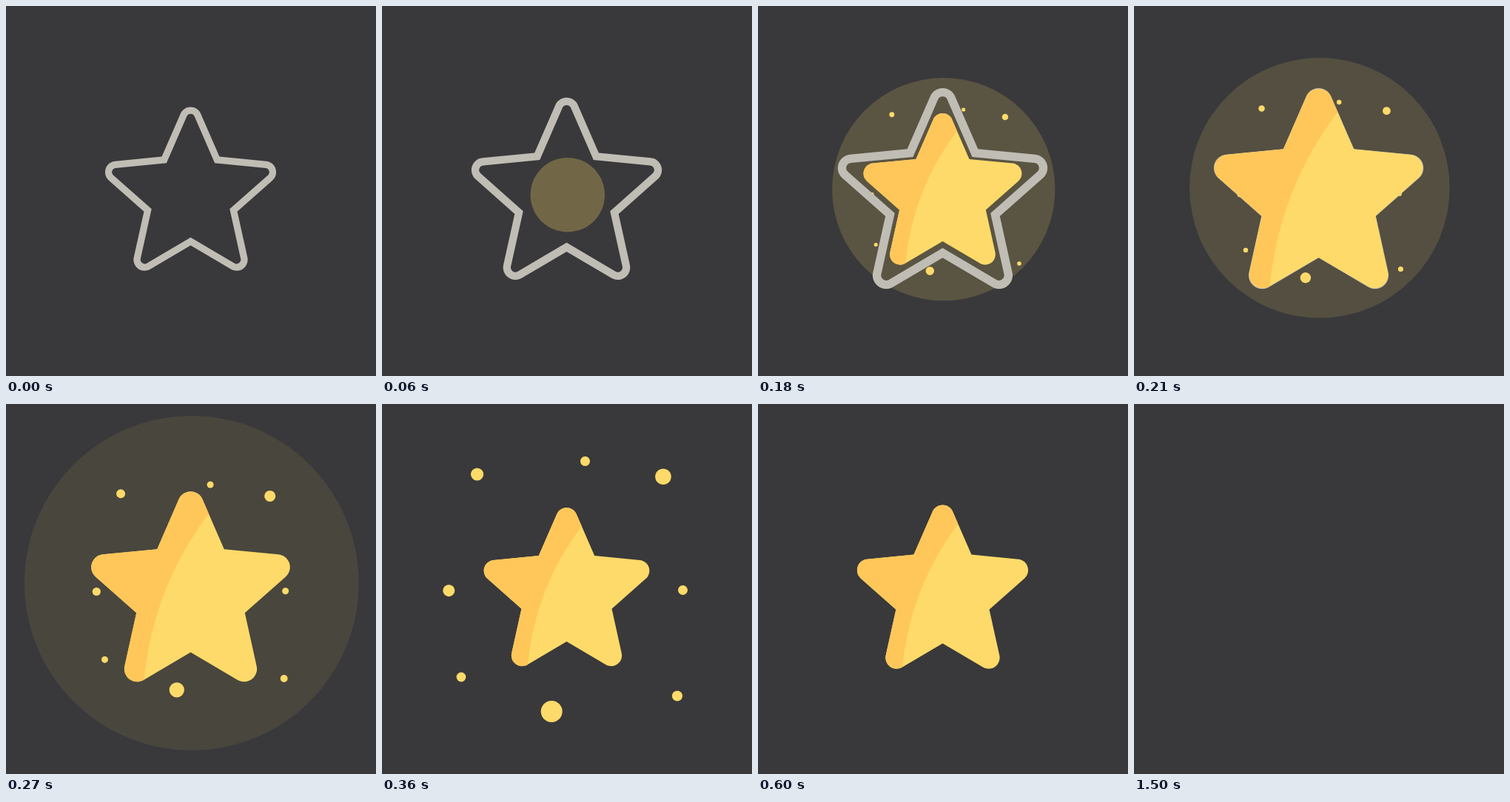
An HTML page with a canvas for the animation above (1.53 s loop, 500 by 500 pixels).

```html
<!DOCTYPE html>
<html lang="en">
<head>
<meta charset="utf-8">
<title>Star burst</title>
<style>
  html, body { margin: 0; width: 100%; height: 100%; overflow: hidden; background: #39393b; }
  canvas { display: block; width: 500px; height: 500px; }
</style>
</head>
<body>
<canvas id="stage" width="500" height="500"></canvas>
<script>
const ctx = document.getElementById('stage').getContext('2d');
const LOOP = 1530, STEP = 30, SHOWN = 1500;
const BG = '#39393b', GREY = '#c0bdb5', YELLOW = '#fdda69', SHADE = '#ffc75a';
const CX = 249.5, CY = 249.3;

// Position and radius at full size, clockwise from the right, 45 degrees apart in heading
const sparks = [
  [406.5, 251.5, 6.5], [399, 394.5, 7.1], [229.2, 415.5, 14.5], [107, 369, 6.4],
  [90.3, 252.2, 8], [128.6, 95, 8.6], [274.5, 77.3, 6.5], [380, 98.2, 10.8]
];
const FULL = 360;

const clamp = (v, lo, hi) => Math.min(hi, Math.max(lo, v));
function ease(t, from, to) {
  const u = clamp((t - from) / (to - from), 0, 1);
  return u * u * (3 - 2 * u);
}

const starSize = t => t <= 210
  ? (t - 85) * .00974
  : 1.218 - .384 * ease(t, 210, 459) + .166 * ease(t, 459, 600);
const outlineSize = t => 1 + .226 * Math.min(t / 120, 1);
const sparkSize = t => clamp(Math.min((t - 62) / 298, (540 - t) / 100), 0, 1.05);
const swing = t => Math.sin(.0034 * (t - 295)) / 1.149;

function starPath() {
  const path = new Path2D();
  const at = (k, r) => {
    const a = k * Math.PI / 5;
    return [r * Math.sin(a), 7.9 - r * Math.cos(a)];
  };
  path.moveTo(...at(-1, 66.3));
  for (let k = 0; k < 10; k += 2) {
    path.arcTo(...at(k, 143.2), ...at(k + 1, 66.3), 14.9);
    path.lineTo(...at(k + 1, 66.3));
  }
  path.closePath();
  return path;
}
const star = starPath();
const shade = new Path2D('M22.5 -89 Q-44.5 -1.3 -54.5 109 L-130 130 V-130 H22.5Z');

function disc(x, y, r) {
  ctx.beginPath();
  ctx.arc(x, y, r, 0, 2 * Math.PI);
  ctx.fill();
}

function scaled(s, paint) {
  ctx.save();
  ctx.translate(CX, CY);
  ctx.scale(s, s);
  paint();
  ctx.restore();
}

function drawGlow(t) {
  ctx.globalAlpha = Math.max(0, .34 * (1 - t / 350));
  disc(250.8, 259 - .063 * t, .837 * t);
  ctx.globalAlpha = 1;
}

// Sparks fly apart on eight headings with a slight common drift
function drawSparks(t) {
  const size = sparkSize(t), p = swing(t) - swing(FULL);
  sparks.forEach(([x, y, r], k) => {
    const a = k * Math.PI / 4, reach = k % 2 ? 133 : 115;
    disc(x + (reach * Math.cos(a) - 6) * p, y + (reach * Math.sin(a) - 5) * p, r * size);
  });
}

function drawOutline() {
  ctx.clip(star);
  ctx.strokeStyle = GREY;
  ctx.lineWidth = 18.6;
  ctx.stroke(star);
}

function drawStar() {
  ctx.fillStyle = YELLOW;
  ctx.fill(star);
  ctx.clip(star);
  ctx.fillStyle = SHADE;
  ctx.fill(shade);
}

function draw(t) {
  ctx.fillStyle = BG;
  ctx.fillRect(0, 0, 500, 500);
  if (t >= SHOWN) return;
  ctx.fillStyle = YELLOW;
  drawGlow(t);
  drawSparks(t);
  if (t <= 210) scaled(outlineSize(t), drawOutline);
  const size = starSize(t);
  if (size > 0) scaled(size, drawStar);
}

const start = performance.now();
function tick() {
  const t = (performance.now() - start) % LOOP;
  draw(Math.floor(t / STEP) * STEP);
  requestAnimationFrame(tick);
}
tick();
</script>
</body>
</html>
```
